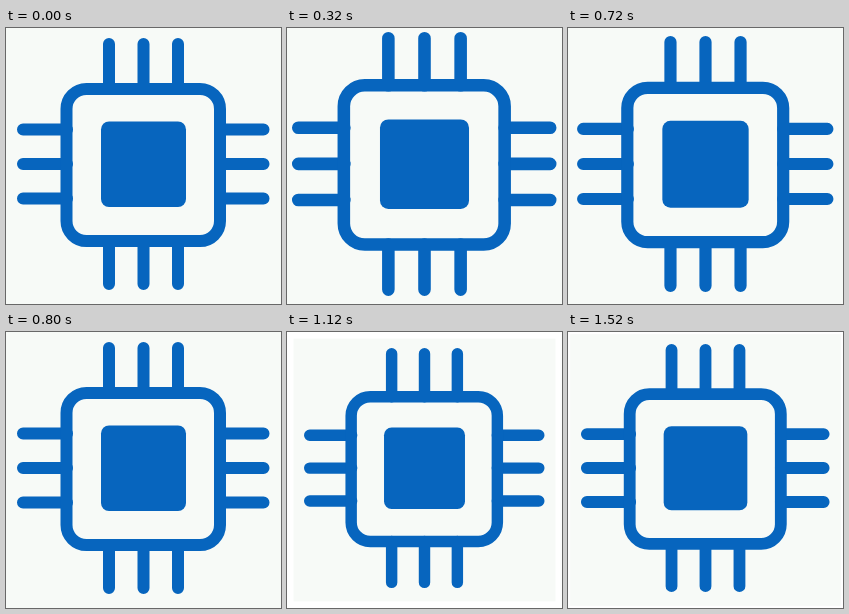
Animation, 275 px wide and 276 px high, one loop 1600 ms. Source, as an HTML page:

```html
<!DOCTYPE html>
<html lang="en">
<head>
<meta charset="utf-8">
<title>Pulsing chip</title>
<style>
  html, body { margin: 0; width: 100%; height: 100%; overflow: hidden; background: #fff; }
  svg { display: block; width: 100%; height: 100%; }
  .panel { fill: #f7faf7; }
  .lines { fill: none; stroke: #0765be; stroke-width: 12; stroke-linecap: round; }
  .core { fill: #0765be; }
</style>
</head>
<body>
<svg viewBox="0 0 275 276">
  <g id="chip">
    <rect class="panel" width="275" height="276"/>
    <g class="lines">
      <path d="M103 16V61M137.5 16V61M172 16V61"/>
      <path d="M103 213V256M137.5 213V256M172 213V256"/>
      <path d="M17 101.5H61M17 136H61M17 170.5H61"/>
      <path d="M214 101.5H257.5M214 136H257.5M214 170.5H257.5"/>
      <rect x="60.5" y="61" width="153.5" height="152" rx="20"/>
    </g>
    <rect class="core" x="95" y="93.5" width="85" height="85.5" rx="8"/>
  </g>
</svg>
<script>
  const LOOP = 1600, STEP = 80, SWELL = 0.05;
  const chip = document.getElementById('chip');

  function draw(now) {
    const time = Math.floor((now % LOOP) / STEP) * STEP;
    const scale = 1 + SWELL * Math.sin(2 * Math.PI * time / LOOP);
    chip.setAttribute('transform', `translate(137.5 138) scale(${scale}) translate(-137.5 -138)`);
  }

  const start = performance.now();
  function tick() {
    draw(performance.now() - start);
    requestAnimationFrame(tick);
  }
  tick();
</script>
</body>
</html>
```
